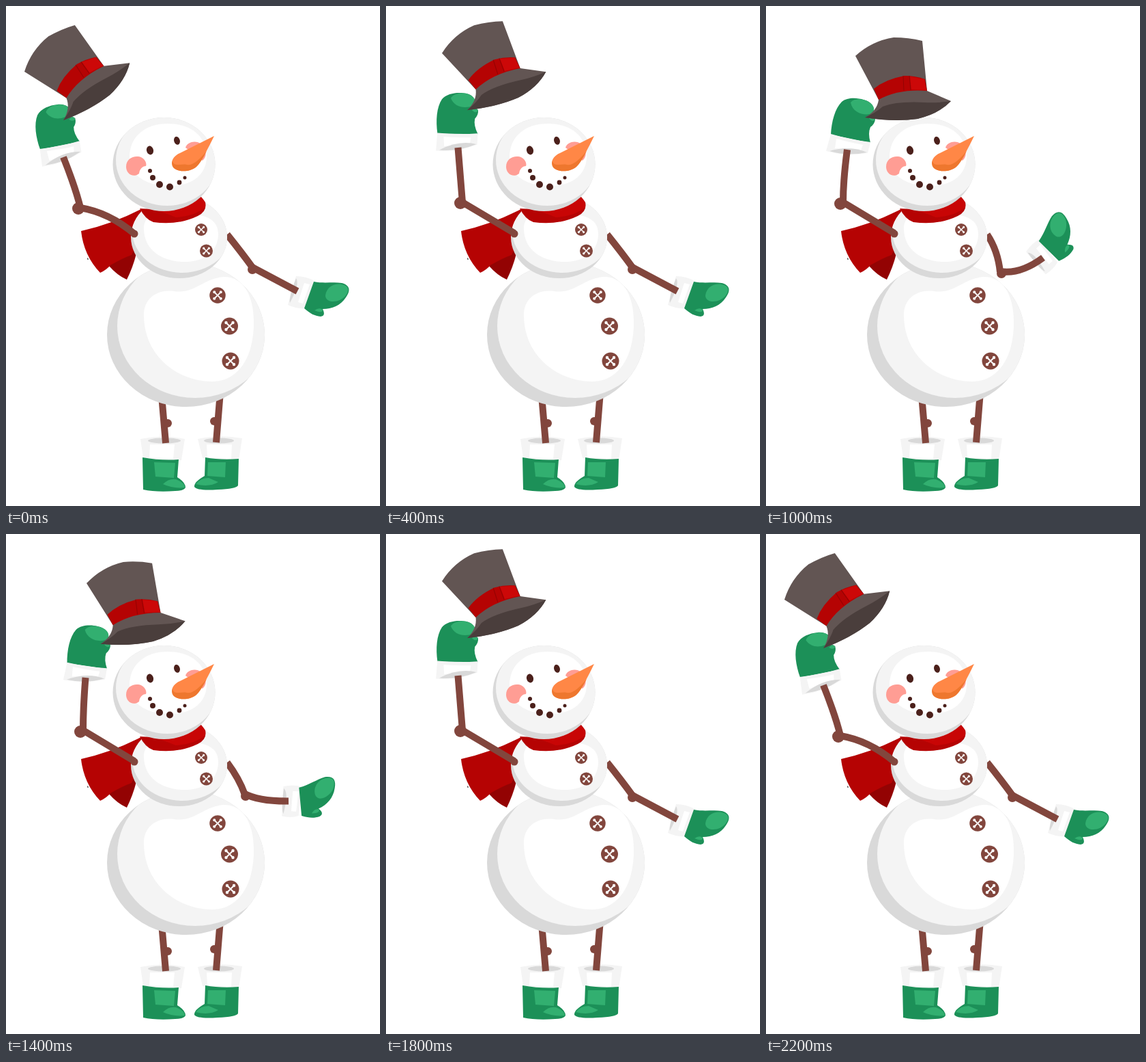
An HTML page for the animation above (2.4 s loop, 548 by 731 pixels).

```html
<!DOCTYPE html>
<html lang="en">
<head>
<meta charset="utf-8">
<title>Snowman</title>
<style>
  html, body { margin: 0; width: 100%; height: 100%; overflow: hidden; background: #fff; }
  svg { display: block; width: 100%; height: 100%; }
  .wood { fill: #82463d; }
  .limb { fill: none; stroke: #82463d; stroke-width: 10; }
  .green { fill: #1c9058; }
  .mint { fill: #32af70; }
  .shade { fill: #d9d9d9; }
  .snow { fill: #f4f4f4; }
  .white { fill: #fff; }
  .felt { fill: #625553; }
  .coal { fill: #4b201b; }
  .red { fill: #b50303; }
  .pink { fill: #ff9d94; }
</style>
</head>
<body>
<svg viewBox="0 0 548 731">
  <defs>
    <g id="button">
      <circle r="12.5" class="wood"/>
      <path d="M-5,-5L5,5M5,-5L-5,5" stroke="#fff" stroke-width="2"/>
      <path d="M-5,-5h0M5,5h0M5,-5h0M-5,5h0" stroke="#fff" stroke-width="4.4" stroke-linecap="round"/>
    </g>
    <clipPath id="headClip"><ellipse cx="231.5" cy="231.5" rx="75" ry="68.5"/></clipPath>
    <clipPath id="chestClip"><ellipse cx="253.5" cy="338" rx="70.5" ry="60"/></clipPath>
    <clipPath id="bellyClip"><ellipse cx="263.5" cy="480.5" rx="115.5" ry="105.5"/></clipPath>
  </defs>

  <!-- legs and boots -->
  <path class="snow" d="M197,633Q230,626 262,633L257,664L201,661Z"/>
  <path class="white" d="M211,641L247,641L245,662L210,660Z"/>
  <ellipse class="shade" cx="232" cy="635.500" rx="24" ry="4"/>
  <path class="snow" d="M281,633Q314,626 346,632L341,664L288,661Z"/>
  <path class="white" d="M294,641L331,641L330,662L295,660Z"/>
  <ellipse class="shade" cx="312" cy="635.500" rx="22" ry="4"/>
  <path class="limb" d="M228.500,575L234,639M313.500,570L308,638" stroke-width="9"/>
  <circle class="wood" cx="237" cy="610" r="6"/>
  <circle class="wood" cx="305" cy="607" r="6"/>
  <path class="green" d="M200,660Q228,665 253,663L251,689Q263,696 263,704Q260,709 248,709Q220,711 201,707Z"/>
  <path class="mint" d="M217,667L248,668L246,690L219,688ZM230,699Q239,690 249,692Q262,697 262,704Q245,706 230,699Z"/>
  <path class="green" d="M292,660Q314,664 341,662L340,701Q337,706 310,707Q280,709 276,703Q275,696 291,687Z"/>
  <path class="mint" d="M296,667L322,667L321,689L295,687ZM278,699Q285,690 297,690L311,696Q298,704 278,699Z"/>

  <!-- scarf tails -->
  <path fill="#930303" d="M198,299L150,379Q163,394 177,400Q186,382 191,362Z"/>
  <path class="red" d="M198,297Q155,319 110,329Q114,365 138,390Q147,386 153,379Q170,369 184,364L200,330Z"/>
  <path d="M119,369h1v2" stroke="#222" fill="none"/>

  <!-- belly -->
  <g clip-path="url(#bellyClip)">
    <rect class="shade" x="140" y="370" width="250" height="220"/>
    <ellipse class="snow" cx="277" cy="468" rx="114" ry="105"/>
  </g>
  <path class="white" d="M202,452C202,427 222,414 246,417C277,421 286,400 318,396C349,395 364,425 363,466C362,516 339,549 302,549C252,549 202,512 202,452Z"/>
  <use href="#button" transform="translate(310 423) scale(.94)"/>
  <use href="#button" transform="translate(327.500 468)"/>
  <use href="#button" transform="translate(329 519)"/>

  <!-- right arm -->
  <path id="rightArm" class="limb"/>
  <circle id="rightElbow" class="wood" r="7"/>
  <g id="rightCuff">
    <path class="snow" d="M-19,-27Q-4,-27 8,-20L-7,20Q-18,21 -31,15Z"/>
    <path class="white" d="M-7,-17L1,-15L-9,13L-16,11Z"/>
    <path class="shade" d="M-19,-24Q-13,-16 -28,12Q-30,4 -19,-24Z"/>
  </g>
  <path id="rightStub" class="limb"/>
  <g id="rightHand">
    <path class="green" d="M7,-19C22,-16 36,-19 48,-17C59,-14 62,-7 54,4C46,16 34,21 20,21Q25,31 17,32C8,31 2,28 -7,20Z"/>
    <path class="mint" d="M24,1C26,-12 38,-17 48,-15C58,-13 60,-7 54,1C46,12 24,14 24,1ZM8,23Q15,18 20,22Q20,28 8,23Z"/>
  </g>

  <!-- chest and neck scarf -->
  <g clip-path="url(#chestClip)">
    <rect class="shade" x="180" y="270" width="150" height="130"/>
    <ellipse class="snow" cx="258" cy="329" rx="73" ry="61"/>
  </g>
  <path class="white" d="M202,325C202,303 225,300 255,304C290,303 311,310 311,334C310,363 286,375 258,374C224,372 202,354 202,325Z"/>
  <path class="red" d="M196,296Q204,312 216,316Q252,321 281,307Q295,300 292,287L286,279Q245,300 196,296Z"/>
  <path fill="#c80505" d="M223,299Q262,298 286,280Q294,286 291,295Q277,307 249,309Z"/>
  <use href="#button" transform="translate(286 327) scale(.72)"/>
  <use href="#button" transform="translate(293.500 358) scale(.76)"/>

  <!-- head -->
  <g clip-path="url(#headClip)">
    <rect class="shade" x="150" y="160" width="160" height="145"/>
    <ellipse class="snow" cx="236" cy="225" rx="75" ry="67"/>
  </g>
  <path class="white" d="M181,221C181,190 205,172 237,172C271,172 294,190 294,221C293,249 270,263 240,263C207,263 181,249 181,221Z"/>
  <path class="pink" d="M176,235C176,224 185,219 194,220C202,221 207,229 205,234C200,234 196,238 195,245C186,252 176,245 176,235ZM263,207C266,198 279,196 286,202C294,209 295,220 288,226Z"/>
  <g class="coal">
    <ellipse cx="211" cy="211" rx="5" ry="6.500" transform="rotate(-15 211 211)"/>
    <ellipse cx="250.500" cy="197" rx="4.300" ry="6" transform="rotate(-15 250 197)"/>
    <circle cx="211" cy="241" r="3"/><circle cx="215" cy="251" r="4"/>
    <circle cx="225" cy="261" r="5"/><circle cx="240" cy="264.500" r="5"/>
    <circle cx="254" cy="258" r="3.400"/><circle cx="262" cy="251" r="2.500"/>
  </g>
  <path fill="#ff8746" d="M305,190L255,215C243,220 240,231 246,237C255,244 271,242 279,235Q287,227 305,190Z"/>
  <path fill="#ee772e" d="M244,226C245,236 257,230 265,232Q275,235 294,212Q285,230 279,235C270,242 255,244 246,237Q242,233 244,226Z"/>

  <!-- left hand, hat and arm -->
  <g id="leftHand">
    <g transform="translate(-124 -188.500)">
      <path class="green" d="M95,188C96,169 101,150 111,140C119,133 134,134 143,137C155,140 160,148 157,156L150,162Q158,160 160,166Q159,173 153,177Q149,186 153,200Z"/>
      <path class="mint" d="M124,141C130,134 143,136 150,140C159,145 160,152 156,157C145,161 127,157 124,141ZM151,164Q157,160 160,166Q156,171 151,164Z"/>
      <path class="snow" d="M95,187Q125,196 153,199L149,215Q116,220 88,212Z"/>
      <path class="white" d="M103,194Q125,200 142,203L139,211L101,208Z"/>
      <path class="shade" d="M93,212Q124,203 148,214Q119,220 93,212Z"/>
    </g>
  </g>
  <g id="hat">
    <path class="felt" d="M0,0Q24,-22 56,-27Q78,-27 98,-22L105,51L140,66Q122,85 91,92Q55,97 14,90Q32,80 34,64Z"/>
    <path fill="#4a3e3c" d="M14,90Q30,83 40,74Q61,66 101,68Q120,69 140,66Q122,85 91,92Q58,97 14,90Z"/>
    <path class="red" d="M27,48Q44,34 72,29Q88,29 102,34L105,51Q63,48 34,64Z"/>
    <path d="M70,29L71,51M79,29L81,50" stroke="#930303" fill="none"/>
    <path fill="#cc0808" d="M80,30L101,34L104,50L82,49Z"/>
  </g>
  <path id="leftArm" class="limb" stroke-linejoin="round"/>
  <circle class="wood" cx="188" cy="333" r="5.500"/>
  <circle id="leftElbow" class="wood" r="9"/>
</svg>

<script>
const byId = id => document.getElementById(id);

// hat, hand, cuff: x, y, angle. The left arm runs shoulder to wrist.
const raised = [
  { hat: [27, 96, -30], hand: [77, 199, -23], elbow: [106, 296], arm: 'M188,333Q151,302 109,295Q102,266 84,221' },
  { hat: [54, 80.5, -22.6], hand: [91, 188, -16], elbow: [108, 291], arm: 'M188,333Q150,307 111,290L96,212' },
  { hat: [82, 69, -15.1], hand: [104, 181.5, -11], elbow: [109, 288], arm: 'M188,332L112,287L105.5,207' },
  { hat: [106, 69, -7.9], hand: [114.5, 185, -6], elbow: [110, 288], arm: 'M188,332L114,287L113.5,208' },
  { hat: [118, 72, -4.3], hand: [118.5, 187.5, -3.5], elbow: [109, 289], arm: 'M188,332L113,287Q113,255 116.5,210' },
  { hat: [131, 73, 0], hand: [124, 188.5, 0], elbow: [109, 289], arm: 'M188,332L113,287Q113,255 119,210' }
];

// cuff is x, y, angle; turn is the extra bend of the hand at the wrist.
const low = { cuff: [444, 422, 0], turn: 0, elbow: [361, 385], arm: 'M324,334Q345,360 361,382', fore: 'M359,381L427,417' };
const lowered = [low, low, low,
  { cuff: [442, 404, -8], turn: -2, elbow: [360, 383], arm: 'M324,334Q345,359 360,380', fore: 'M358,379L428,401' },
  { cuff: [431, 391, -13], turn: -12, elbow: [351, 383], arm: 'M324,334Q342,358 350,381', fore: 'M348,379Q370,391 414,390.5' },
  { cuff: [414, 358, -57], turn: -8, elbow: [345, 391], arm: 'M324,334Q340,358 343,389', fore: 'M343,388Q372,393 406,368' }
];

const order = [0, 1, 2, 3, 4, 5, 5, 4, 3, 2, 1, 0];

function place(id, [x, y, angle]) {
  byId(id).setAttribute('transform', `translate(${x} ${y}) rotate(${angle})`);
}

function moveDot(id, [x, y]) {
  byId(id).setAttribute('cx', x);
  byId(id).setAttribute('cy', y);
}

function draw(step) {
  const left = raised[step], right = lowered[step];
  place('hat', left.hat);
  place('leftHand', left.hand);
  moveDot('leftElbow', left.elbow);
  byId('leftArm').setAttribute('d', left.arm);

  const [x, y, angle] = right.cuff;
  place('rightCuff', right.cuff);
  place('rightHand', [x, y, angle + right.turn]);
  moveDot('rightElbow', right.elbow);
  byId('rightArm').setAttribute('d', right.arm);
  byId('rightStub').setAttribute('d', right.fore);
}

function tick() {
  draw(order[Math.floor(performance.now() % 2400 / 200)]);
  requestAnimationFrame(tick);
}
tick();
</script>
</body>
</html>
```
